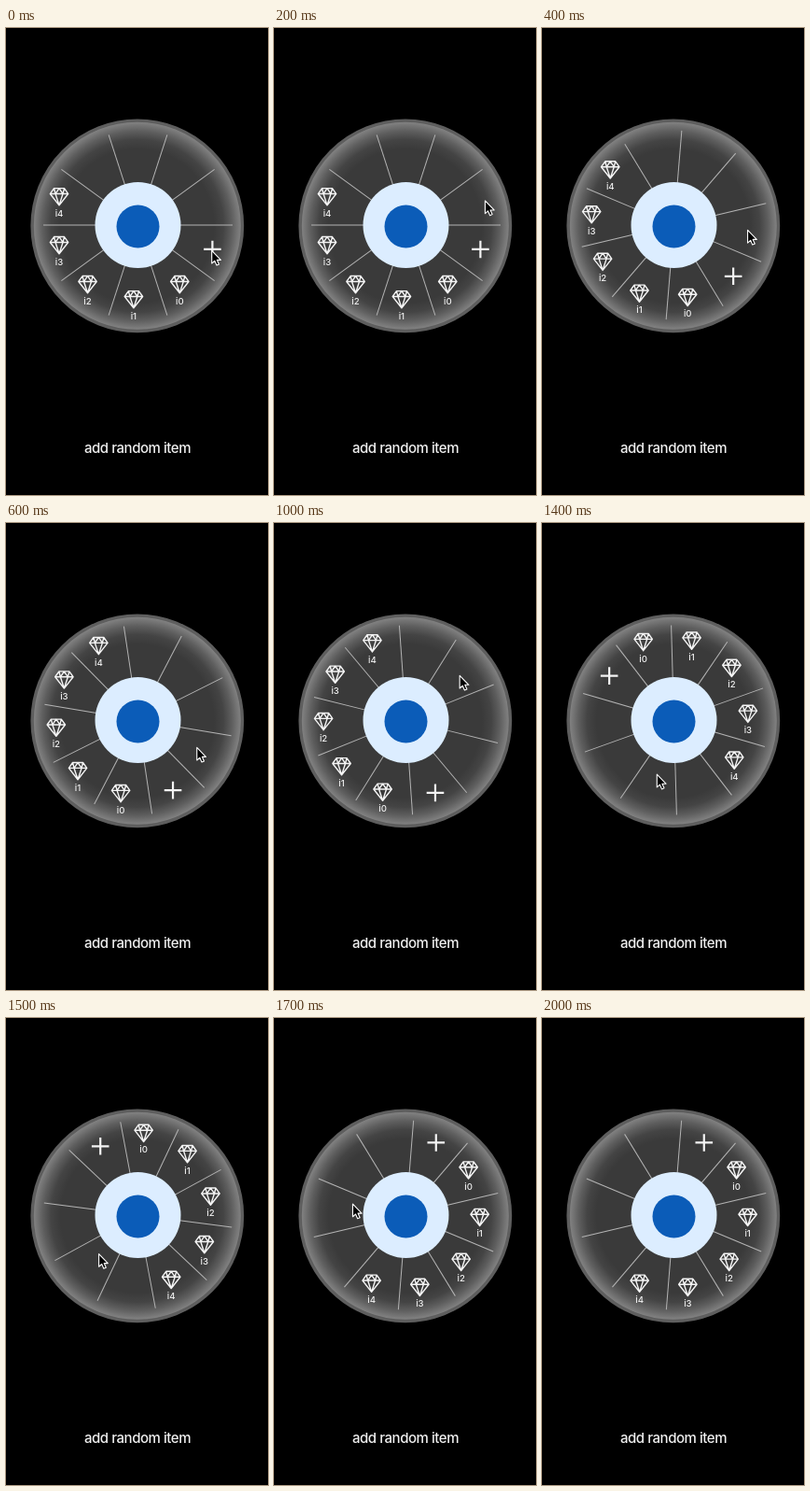
An HTML page for the animation above (2.4 s loop, 281x500 px).

```html
<!DOCTYPE html>
<html lang="en">
<head>
<meta charset="utf-8">
<title>Radial menu</title>
<style>
  html, body { margin: 0; width: 100%; height: 100%; overflow: hidden; background: #000; }
  svg { display: block; width: 100vw; height: 100vh; }
  text { font-family: Inter, Roboto, sans-serif; font-weight: 500; fill: #f0f0f0; text-anchor: middle; }
</style>
</head>
<body>
<svg viewBox="0 0 281 500">
  <defs>
    <radialGradient id="glow">
      <stop offset=".73" stop-color="#3a3a3a"/>
      <stop offset=".82" stop-color="#444"/>
      <stop offset=".9" stop-color="#5e5e5e"/>
      <stop offset="1" stop-color="#888"/>
    </radialGradient>
    <path id="gem" d="M-5.5-8.9H5.5L9.7-3 0 9.3-9.7-3ZM-9.7-3H9.7M-5.5-8.9L-4-3 0-8.9 4-3 5.5-8.9M-4-3L0 9.3 4-3"
      fill="none" stroke="#f4f4f4" stroke-width="1.4" stroke-linejoin="round"/>
  </defs>
  <rect width="281" height="500"/>
  <circle cx="140.8" cy="211.8" r="112.7" fill="url(#glow)" stroke="#5e5e5e" stroke-width="3.4"/>
  <g id="wheel">
    <g id="spokes" stroke="#b4b4b4"></g>
    <g id="items"></g>
    <path id="plus" d="M-9.3 0H9.3M0-9.3V9.3" stroke="#f4f4f4" stroke-width="2.2"/>
    <circle r="46" fill="#dcedff"/>
    <circle r="23" cy="1.5" fill="#0b5cb8"/>
    <path id="cursor" d="M-.2 0V13.7L2.9 10.9 5 15.7 7.5 14.6 5.4 10H9.5Z"
      fill="#000" stroke="#fff" stroke-width="1.1" stroke-linejoin="round"/>
  </g>
  <text x="141" y="455" font-size="15" letter-spacing="-.03em">add random item</text>
</svg>
<script>
const LOOP = 2400, STEP = 100, POINTER_GONE = 2000;
const SECTOR = 36, ITEM_RADIUS = 84;

// Two drags turn the wheel; the pointer moves freely before, between and after them.
// Angles are in degrees, clockwise from the right.
const poses = [
  { time: 0, turn: 0, angle: 19, radius: 84 },
  { time: 200, turn: 0, angle: -17, radius: 89 },
  { time: 640, turn: 50, angle: 29, radius: 68 },
  { time: 1000, turn: 50, angle: -39.5, radius: 75 },
  { time: 1200, turn: 142.4, angle: 51.5, radius: 65 },
  { time: 1690, turn: 274.6, angle: 188, radius: 55 },
  { time: 1800, turn: 274.6, angle: 230, radius: 89 },
  { time: 1900, turn: 274.6, angle: 395, radius: 98 }
];

const $ = id => document.getElementById(id);

function make(parent, tag, attrs = {}) {
  const node = document.createElementNS("http://www.w3.org/2000/svg", tag);
  for (const key in attrs) node.setAttribute(key, attrs[key]);
  return parent.appendChild(node);
}

function placePolar(node, degrees, radius) {
  const angle = degrees * Math.PI / 180;
  node.setAttribute("transform", `translate(${radius * Math.cos(angle)} ${radius * Math.sin(angle)})`);
}

function poseAt(time) {
  const to = poses.find(pose => pose.time > time);
  if (!to) return poses[poses.length - 1];
  const from = poses[poses.indexOf(to) - 1];
  const part = (time - from.time) / (to.time - from.time);
  const mix = key => from[key] + (to[key] - from[key]) * part;
  return { turn: mix("turn"), angle: mix("angle"), radius: mix("radius") };
}

$("wheel").setAttribute("transform", "translate(141.5 211)");

for (let i = 0; i < 10; i++) {
  make($("spokes"), "line", { x1: 45, x2: 101.5, transform: `rotate(${i * SECTOR})` });
}

const items = Array.from({ length: 5 }, (_, i) => {
  const item = make($("items"), "g");
  make(item, "use", { href: "#gem", x: -4.6, y: -4.5 });
  make(item, "text", { x: -4.6, y: 16.7, "font-size": 9.6 }).textContent = "i" + i;
  return item;
});

function draw(now) {
  const time = Math.floor(now % LOOP / STEP) * STEP;
  const { turn, angle, radius } = poseAt(time);
  $("spokes").setAttribute("transform", `rotate(${turn})`);
  placePolar($("plus"), turn + SECTOR / 2, ITEM_RADIUS);
  items.forEach((item, i) => placePolar(item, turn + SECTOR * (i + 1.5), ITEM_RADIUS));
  placePolar($("cursor"), angle, radius);
  $("cursor").setAttribute("visibility", time < POINTER_GONE ? "visible" : "hidden");
}

const start = performance.now();
function tick() {
  draw(performance.now() - start);
  requestAnimationFrame(tick);
}
tick();
</script>
</body>
</html>
```
